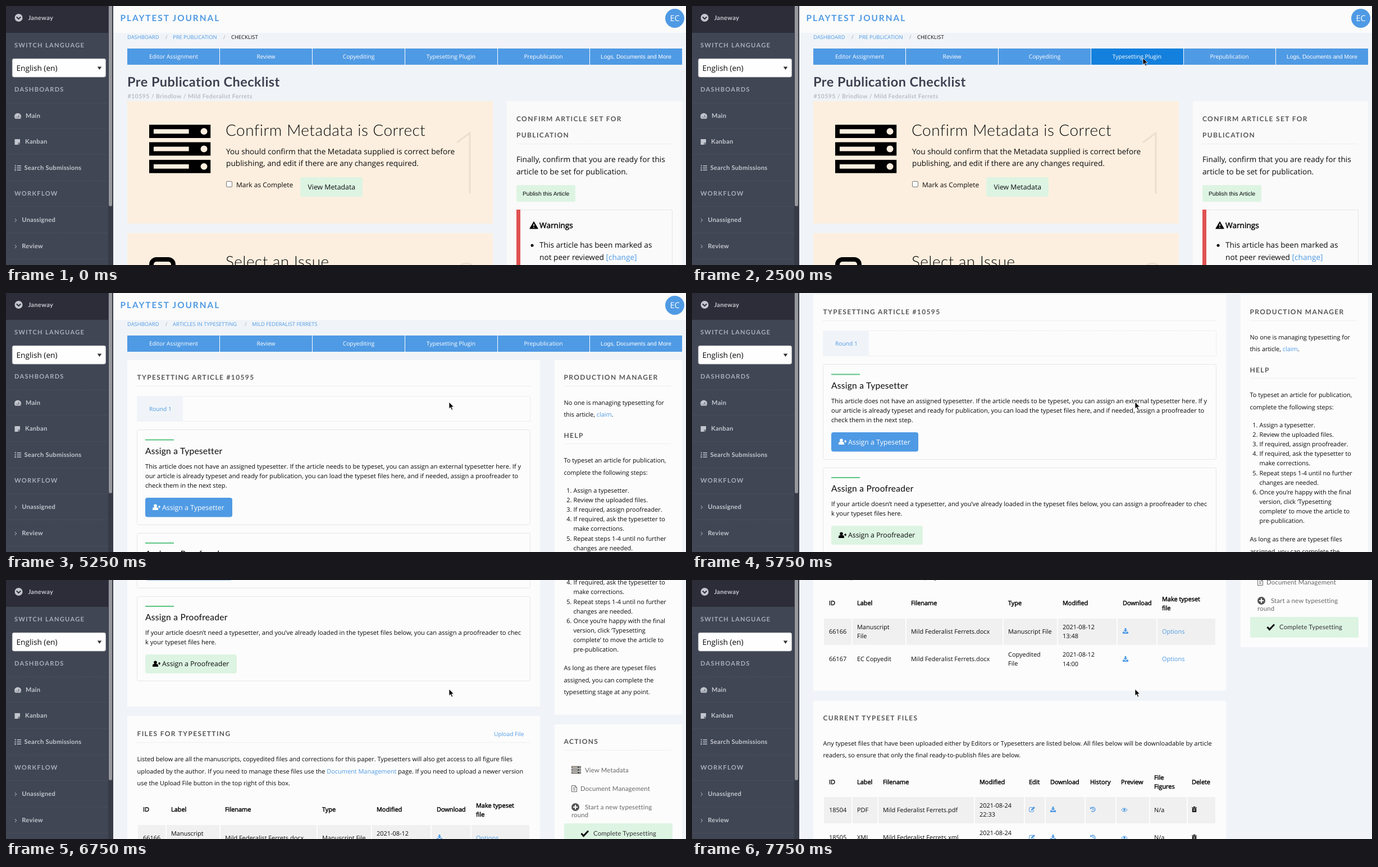
These frames come from a looping animation (1211 px wide and 463 px high, 8 s). An HTML page:

```html
<!DOCTYPE html>
<html lang="en">
<head>
<meta charset="utf-8">
<title>Typesetting workflow</title>
<style>
html, body { margin: 0; width: 100%; height: 100%; overflow: hidden; background: #f0f4f8; }
svg { display: block; }
#stage { width: 100vw; height: 100vh; }
text { font-family: "Open Sans", "Noto Sans", sans-serif; font-size: 10.944px; fill: #0a0a0a; white-space: pre; text-rendering: geometricPrecision; }
.link, .link text { fill: #4f9ae4; }
.white, .white text { fill: #fff; }
.body { font-size: 13.68px; }
.card { font-size: 11.115px; }
.small, .nav text { font-size: 10.26px; }
.nav text { text-anchor: middle; fill: #fff; }
.crumb text { font-size: 9.405px; }
.crumb .sep { fill: #a9a9a9; }
.btn { font-size: 12.31px; }
.arial { font-family: "Liberation Sans", Arial, sans-serif !important; font-size: 10.26px; }
.heavy, .heavy text { stroke: #0a0a0a; stroke-width: .5px; }
.title, .brand, .page, .sub, .step, .head, .act, .side text { font-family: Lato, sans-serif; }
.title { font-size: 11.97px; font-weight: 700; letter-spacing: 1.38px; fill: #555; }
.brand { font-size: 15.4px; font-weight: 700; letter-spacing: 1.94px; fill: #4f9ae4; }
.page { font-size: 23.5px; font-weight: 700; letter-spacing: .46px; fill: #3d4150; }
.sub { font-size: 10.6px; font-weight: 700; letter-spacing: .4px; fill: #b9bcc4; }
.step { font-size: 28px; font-weight: 300; letter-spacing: .45px; }
.head { font-size: 15.6px; letter-spacing: .24px; }
.act { font-size: 11.4px; letter-spacing: .15px; fill: #666; }
.side text { font-size: 11.1px; font-weight: 700; letter-spacing: .3px; fill: #c3c6ce; }
.side .label { letter-spacing: 1.28px; fill: #a9aeb9; }
.side .choice { font: 13.68px "Open Sans", sans-serif; letter-spacing: 0; fill: #0a0a0a; }
.panel { fill: #fcfcfc; }
.box { fill: none; stroke: #e6e6e8; }
.rule { stroke: #e8e8ea; stroke-dasharray: 2 1; }
.green { fill: #ddf4e3; }
.mark { fill: #5cc582; }
.blue { fill: #4f9ae4; }
.cell { fill: #f0f0f0; }
.line { fill: none; stroke: currentColor; }

.hover, .first, .second, .close, .scroll, .cursor { animation: 8s step-end infinite; }
.hover { animation-name: hover; }
.first { animation-name: first; }
.second { animation-name: second; }
.close { animation-name: close; }
.scroll { animation-name: scroll; }
.cursor { animation-name: cursor; }
@keyframes hover {
  0%, 46.875%, 65.625%, 100% { fill: #4f9ae4; }
  28.125%, 62.5% { fill: #2f8be0; }
  31.25% { fill: #1480dd; }
}
@keyframes first { 0% { visibility: visible; } 46.875%, 100% { visibility: hidden; } }
@keyframes second { 0% { visibility: hidden; } 46.875%, 100% { visibility: visible; } }
@keyframes close { 0%, 53.125%, 100% { visibility: hidden; } 46.875% { visibility: visible; } }
@keyframes scroll {
  0% { transform: translateY(0); }
  68.75% { transform: translateY(-30px); }
  71.875% { transform: translateY(-117px); }
  75% { transform: translateY(-210px); }
  78.125% { transform: translateY(-290px); }
  81.25% { transform: translateY(-360px); }
  84.375% { transform: translateY(-400px); }
  87.5% { transform: translateY(-425px); }
  90.625% { transform: translateY(-468px); }
  93.75% { transform: translateY(-620px); }
  96.875%, 100% { transform: translateY(-769px); }
}
@keyframes cursor {
  0% { transform: translate(911px, -40px); }
  9.375% { transform: translate(911px, 1px); }
  12.5% { transform: translate(854px, 50px); }
  15.625% { transform: translate(810px, 82px); }
  18.75% { transform: translate(794px, 95px); }
  28.125% { transform: translate(803px, 93px); }
  62.5% { transform: translate(796px, 133px); }
  65.625%, 100% { transform: translate(789px, 195px); }
}
</style>
</head>
<body>
<svg id="stage" viewBox="0 0 1211 463">
<defs>
  <symbol id="server" viewBox="0 0 110 87">
    <path d="M0 0h110v24H0zM0 31.500h110v24H0zM0 63h110v24H0z"/>
    <path fill="#fdefdf" d="M8 8h63v8H8zM8 39.500h63v8H8zM8 71h63v8H8z"/>
    <g fill="#fdefdf"><circle cx="98" cy="12" r="6"/><circle cx="98" cy="43.500" r="6"/><circle cx="98" cy="75" r="6"/></g>
  </symbol>
  <symbol id="user" viewBox="0 0 14 12">
    <circle cx="5" cy="3.300" r="2.800"/>
    <path d="M0 11V9q0-3 3-3h4q3 0 3 3v2zM10 4.500h1.500V3h1.500v1.500h1.500V6H13v1.500h-1.500V6H10z"/>
  </symbol>
  <symbol id="download" viewBox="0 0 10 10">
    <path d="M3.700 0h2.600v3.500h2.200L5 7 1.500 3.500h2.200zM0 6.500h2.700L5 8.500l2.300-2H10V10H0z"/>
  </symbol>
  <symbol id="edit" viewBox="0 0 11 10">
    <path class="line" d="M7 1.500H2q-1.300 0-1.300 1.300v5.200q0 1.300 1.300 1.300h5.200q1.300 0 1.300-1.300V6.500"/>
    <path d="M4 7V5l5-5 2 2-5 5z"/>
  </symbol>
  <symbol id="history" viewBox="0 0 10 10">
    <path class="line" stroke-width="1.300" d="M1.500 3A4 4 0 1 1 2 8M5 2.800V5.500h1.700"/>
    <path d="M0 .7V4.200h3.500z"/>
  </symbol>
  <symbol id="eye" viewBox="0 0 12 8">
    <path class="line" d="M.6 4Q6-2.500 11.400 4 6 10.500.6 4z"/><circle cx="6" cy="3.800" r="2"/>
  </symbol>
  <symbol id="trash" viewBox="0 0 9 10">
    <path d="M0 1.300h2.700L3.300 0h2.400l.6 1.300H9v1H0zM.8 3h7.400v6q0 1-1 1H1.800q-1 0-1-1z"/>
    <path stroke="#f0f0f0" stroke-width=".7" d="M3 4v4.500M4.500 4v4.500M6 4v4.500"/>
  </symbol>
</defs>

<rect width="1211" height="463" fill="#f0f4f8"/>

<g class="scroll">
  <rect x="190" width="1021" height="48" fill="#fbfbfb"/>
  <text class="brand" x="203.500" y="26.500">PLAYTEST JOURNAL</text>
  <circle class="blue" cx="1191" cy="22" r="17"/>
  <text class="white" x="1191" y="27" text-anchor="middle" style="font-size:14.5px">EC</text>
  <g class="nav">
    <rect class="blue" x="216" y="76" width="988" height="29"/>
    <rect class="hover" x="711" y="76" width="164" height="29"/>
    <path stroke="#fff" d="M380.500 76v29M545.500 76v29M710.500 76v29M875.500 76v29M1039.500 76v29"/>
    <text x="298.500" y="94">Editor Assignment</text>
    <text x="463" y="94">Review</text>
    <text x="628" y="94">Copyediting</text>
    <text x="792.500" y="94">Typesetting Plugin</text>
    <text x="957" y="94">Prepublication</text>
    <text class="arial" x="1122" y="94">Logs, Documents and More</text>
  </g>

  <g class="first">
    <g class="crumb">
      <text class="link" x="216" y="59">DASHBOARD</text><text class="sep" x="284" y="59">/</text>
      <text class="link" x="297" y="59">PRE PUBLICATION</text><text class="sep" x="387" y="59">/</text>
      <text x="401" y="59">CHECKLIST</text>
    </g>
    <text class="page" x="216" y="144">Pre Publication Checklist</text>
    <text class="sub" x="216.500" y="165">#10595 / Brindlow / Mild Federalist Ferrets</text>
    <path fill="#fdefdf" d="M216 170h651v219H216zM216 406h651v70H216z"/>
    <use href="#server" x="255" y="212" width="109.500" height="87"/>
    <text class="step" x="391" y="232">Confirm Metadata is Correct</text>
    <text class="body" x="392" y="264.500">You should confirm that the Metadata supplied is correct before<tspan x="392" dy="21.500">publishing, and edit if there are any changes required.</tspan></text>
    <rect x="392.500" y="313.500" width="10" height="10" rx="1.500" fill="#fff" stroke="#767676"/>
    <text x="410" y="324" style="font-size:11.97px">Mark as Complete</text>
    <rect class="green" x="524" y="306" width="111" height="35" rx="3"/>
    <text class="btn" x="537.500" y="328">View Metadata</text>
    <g fill="none" stroke="#eadfd0" stroke-width="3">
      <path d="M803 244L826 227V335"/><path d="M806 475Q807 460 820 460T834 475"/>
    </g>
    <rect x="259" y="453" width="39" height="40" rx="9" fill="none" stroke="#000" stroke-width="8"/>
    <text class="step" x="391" y="467">Select an Issue</text>

    <rect x="892" y="170" width="312" height="300" fill="#fafafa"/>
    <text class="title" x="909" y="205.500">CONFIRM ARTICLE SET FOR<tspan x="909" dy="29">PUBLICATION</tspan></text>
    <path class="rule" d="M909 246.500h275"/>
    <text class="body" x="909" y="279">Finally, confirm that you are ready for this<tspan x="909" dy="21.500">article to be set for publication.</tspan></text>
    <rect class="green" x="909" y="320" width="105" height="30" rx="3"/>
    <text class="arial" x="920" y="339">Publish this Article</text>
    <rect class="box" x="909.500" y="364.500" width="277" height="110"/>
    <rect x="909" y="364" width="7" height="110" fill="#e05252"/>
    <path d="M940 385.500l7.300 12.500h-14.600z" stroke="#0a0a0a" stroke-linejoin="round"/>
    <path stroke="#fff" stroke-width="1.600" d="M940 389.500v4M940 395v1.600"/>
    <text class="body heavy" x="950" y="397">Warnings</text>
    <circle cx="937" cy="428" r="2.500"/>
    <text class="body" x="950" y="432">This article has been marked as<tspan x="950" dy="21.500">not peer reviewed </tspan><tspan class="link">[change]</tspan></text>
  </g>

  <g class="second">
    <g class="crumb link">
      <text x="216" y="59">DASHBOARD</text><text class="sep" x="284" y="59">/</text>
      <text x="297" y="59">ARTICLES IN TYPESETTING</text><text class="sep" x="425" y="59">/</text>
      <text x="438" y="59">MILD FEDERALIST FERRETS</text>
    </g>
    <path class="panel" d="M216 120h735v506H216zM216 643h735v324H216zM216 985h735v280H216zM977 120h227v521H977zM977 658h227v231H977z"/>

    <text class="title" x="233.500" y="155">TYPESETTING ARTICLE #10595</text>
    <path class="rule" d="M233 166.500h701M233 690.500h701M994 166.500h190M994 269.500h190M994 704.500h190"/>
    <rect class="rule" x="233.500" y="184.500" width="700" height="45" fill="none"/>
    <rect x="233" y="184" width="82" height="46" fill="#f0f4f8"/>
    <text class="small link" x="255" y="210.500">Round 1</text>

    <rect class="box" x="233.500" y="244.500" width="700" height="170" rx="3"/>
    <rect class="mark" x="248" y="261.500" width="51" height="2"/>
    <text class="head" x="248" y="288">Assign a Typesetter</text>
    <text class="card" x="248" y="313.500">This article does not have an assigned typesetter. If the article needs to be typeset, you can assign an external typesetter here. If y<tspan x="248" dy="17">our article is already typeset and ready for publication, you can load the typeset files here, and if needed, assign a proofreader to</tspan><tspan x="248" dy="17">check them in the next step.</tspan></text>
    <rect class="blue" x="248" y="366" width="155" height="34.500" rx="4"/>
    <use class="white" href="#user" x="261" y="377" width="14" height="12"/>
    <text class="btn white" x="278" y="388">Assign a Typesetter</text>

    <rect class="box" x="233.500" y="429.500" width="700" height="151" rx="3"/>
    <rect class="mark" x="248" y="446" width="51" height="2"/>
    <text class="head" x="248" y="472">Assign a Proofreader</text>
    <text class="card" x="248" y="498">If your article doesn’t need a typesetter, and you’ve already loaded in the typeset files below, you can assign a proofreader to chec<tspan x="248" dy="17">k your typeset files here.</tspan></text>
    <rect class="green" x="248" y="533" width="163" height="34" rx="4"/>
    <use href="#user" x="261" y="544" width="14" height="12"/>
    <text class="btn" x="278" y="554">Assign a Proofreader</text>

    <text class="title" x="233.500" y="678.500">FILES FOR TYPESETTING</text>
    <text class="small link" x="869" y="679">Upload File</text>
    <text x="233.500" y="724">Listed below are all the manuscripts, copyedited files and corrections for this paper. Typesetters will also get access to all figure files<tspan x="233.500" dy="21.500">uploaded by the author. If you need to manage these files use the </tspan><tspan class="link">Document Management</tspan><tspan> page. If you need to upload a newer version</tspan><tspan x="233.500" dy="21.500">use the Upload File button in the top right of this box.</tspan></text>
    <g class="heavy">
      <text x="244" y="814">ID</text><text x="294" y="814">Label</text><text x="390" y="814">Filename</text>
      <text x="563" y="814">Type</text><text x="660" y="814">Modified</text><text x="767" y="814">Download</text>
      <text x="837" y="806.500">Make typeset<tspan x="837" dy="16">file</tspan></text>
    </g>
    <path class="cell" d="M235 838h49v47h-49zM286 838h94v47h-94zM382 838h171v47H382zM555 838h95v47h-95zM652 838h104v47H652zM758 838h69v47h-69zM829 838h103v47H829z"/>
    <text x="244" y="864.500">66166</text>
    <text x="294" y="856.500">Manuscript<tspan x="294" dy="16">File</tspan></text>
    <text x="390" y="864.500">Mild Federalist Ferrets.docx</text>
    <text x="563" y="864.500">Manuscript File</text>
    <text x="660" y="856.500">2021-08-12<tspan x="660" dy="16.500">13:48</tspan></text>
    <text class="link" x="837" y="864.500">Options</text>
    <text x="244" y="914">66167</text>
    <text x="294" y="914">EC Copyedit</text>
    <text x="390" y="914">Mild Federalist Ferrets.docx</text>
    <text x="563" y="906">Copyedited<tspan x="563" dy="16">File</tspan></text>
    <text x="660" y="906">2021-08-12<tspan x="660" dy="16.500">14:00</tspan></text>
    <text class="link" x="837" y="914">Options</text>
    <g class="link">
      <use href="#download" x="767" y="855" width="10" height="10"/>
      <use href="#download" x="767" y="905" width="10" height="10"/>
    </g>

    <text class="title" x="233.500" y="1020">CURRENT TYPESET FILES</text>
    <text x="233.500" y="1064.500">Any typeset files that have been uploaded either by Editors or Typesetters are listed below. All files below will be downloadable by article<tspan x="233.500" dy="21.500">readers, so ensure that only the final ready-to-publish files are below.</tspan></text>
    <g class="heavy">
      <text x="244" y="1134">ID</text><text x="294" y="1134">Label</text><text x="340" y="1134">Filename</text>
      <text x="512" y="1134">Modified</text><text x="600" y="1134">Edit</text><text x="638" y="1134">Download</text>
      <text x="709" y="1134">History</text><text x="764" y="1134">Preview</text>
      <text x="823" y="1126">File<tspan x="823" dy="16">Figures</tspan></text><text x="890" y="1134">Delete</text>
    </g>
    <path class="cell" d="M235 1157h49v47h-49zM286 1157h44v47h-44zM332 1157h170v47H332zM504 1157h87v47h-87zM593 1157h35v47h-35zM630 1157h69v47h-69zM701 1157h53v47h-53zM756 1157h58v47h-58zM816 1157h65v47h-65zM883 1157h49v47h-49z"/>
    <text x="244" y="1183.500">18504</text><text x="294" y="1183.500">PDF</text>
    <text x="340" y="1183.500">Mild Federalist Ferrets.pdf</text>
    <text x="512" y="1176">2021-08-24<tspan x="512" dy="16">22:33</tspan></text>
    <text x="823" y="1183.500">N/a</text>
    <text x="244" y="1233">18505</text><text x="294" y="1233">XML</text>
    <text x="340" y="1233">Mild Federalist Ferrets.xml</text>
    <text x="512" y="1225">2021-08-24<tspan x="512" dy="16">22:33</tspan></text>
    <text x="823" y="1233">N/a</text>
    <g id="tools">
      <g class="link" color="#4f9ae4">
        <use href="#edit" x="600" y="1174" width="11" height="10"/>
        <use href="#download" x="638" y="1174" width="10" height="10"/>
        <use href="#history" x="709" y="1174" width="10" height="10"/>
        <use href="#eye" x="764" y="1176" width="12" height="8"/>
      </g>
      <use href="#trash" x="890" y="1174" width="9" height="10"/>
    </g>
    <use href="#tools" y="50"/>

    <text class="title" x="993.500" y="155">PRODUCTION MANAGER</text>
    <text x="993.500" y="199.500">No one is managing typesetting for<tspan x="993.500" dy="21.500">this article, </tspan><tspan class="link">claim</tspan><tspan>.</tspan></text>
    <text class="title" x="993.500" y="258.500">HELP</text>
    <text x="993.500" y="303">To typeset an article for publication,<tspan x="993.500" dy="21.500">complete the following steps:</tspan></text>
    <text text-anchor="end" x="1007.500" y="357">1.<tspan x="1007.500" dy="17.100">2.</tspan><tspan x="1007.500" dy="17.100">3.</tspan><tspan x="1007.500" dy="17.100">4.</tspan><tspan x="1007.500" dy="34.200">5.</tspan><tspan x="1007.500" dy="34.200">6.</tspan></text>
    <text x="1010.500" y="357">Assign a typesetter.<tspan x="1010.500" dy="17.100">Review the uploaded files.</tspan><tspan x="1010.500" dy="17.100">If required, assign proofreader.</tspan><tspan x="1010.500" dy="17.100">If required, ask the typesetter to</tspan><tspan x="1010.500" dy="17.100">make corrections.</tspan><tspan x="1010.500" dy="17.100">Repeat steps 1-4 until no further</tspan><tspan x="1010.500" dy="17.100">changes are needed.</tspan><tspan x="1010.500" dy="17.100">Once you’re happy with the final</tspan><tspan x="1010.500" dy="17.100">version, click ‘Typesetting</tspan><tspan x="1010.500" dy="17.100">complete’ to move the article to</tspan><tspan x="1010.500" dy="17.100">pre-publication.</tspan></text>
    <text x="993.500" y="561">As long as there are typeset files<tspan x="993.500" dy="21.500">assigned, you can complete the</tspan><tspan x="993.500" dy="21.500">typesetting stage at any point.</tspan></text>

    <text class="title" x="993.500" y="693">ACTIONS</text>
    <use href="#server" x="1007" y="732" width="17" height="15" fill="#555"/>
    <text class="act" x="1031" y="743.500">View Metadata</text>
    <path fill="none" stroke="#666" d="M1007.500 767.500h6l3 3v8h-9zM1013.500 767.500v3h3M1010 771h2M1010 773h4M1010 775.500h4"/>
    <text class="act" x="1023" y="777">Document Management</text>
    <circle cx="1014" cy="806" r="7" fill="#555"/>
    <path stroke="#fcfcfc" stroke-width="2" d="M1010 806h8M1014 802v8"/>
    <text class="act" x="1031" y="810">Start a new typesetting<tspan x="1007" dy="13.500">round</tspan></text>
    <rect class="green" x="994" y="835" width="193" height="37" rx="3"/>
    <path fill="none" stroke="#0a0a0a" stroke-width="3" d="M1024.500 853l4 4.500 8.500-9"/>
    <text class="act" style="fill:#333" x="1046" y="856.500">Complete Typesetting</text>
  </g>
</g>

<g class="side">
  <rect width="191" height="463" fill="#404654"/>
  <rect width="191" height="48" fill="#2c2d38"/>
  <path stroke="#4a505d" stroke-dasharray="2 1" d="M0 94.500h183M0 173.500h183M0 218.500h183M0 265.500h183M0 312.500h183M0 358.500h183M0 405.500h183M0 452.500h183"/>
  <rect x="182" width="9" height="463" fill="#363b47"/>
  <rect x="183" y="-6" width="6" height="364" rx="3" fill="#96989d"/>
  <circle cx="22.500" cy="21" r="7" fill="#c3c6ce"/>
  <path fill="none" stroke="#2c2d38" stroke-width="2" d="M18.800 19.500l3.700 3.700 3.700-3.700"/>
  <text x="39.500" y="24.500">Janeway</text>
  <text class="label" x="15" y="73.500">SWITCH LANGUAGE</text>
  <rect x="11.300" y="94.300" width="166.200" height="32.700" rx="3" fill="#fefefe" stroke="#cacaca" stroke-width=".8"/>
  <text class="choice" x="18.500" y="116">English (en)</text>
  <path fill="#333" d="M162.700 108.500h7.600l-3.800 5.500z"/>
  <text class="label" x="15" y="153">DASHBOARDS</text>
  <g fill="#c3c6ce">
    <path d="M16.500 201.500a6 6 0 1 1 9 0z"/>
    <path d="M15.500 238h9.500v6.500h-3.500V248h-6z"/><path d="M22.500 245.500H25l-2.500 2.500z"/>
    <path d="M19.500 285h7.500v1.600h-7.500zM19.500 288.700h7.500v1.600h-7.500zM19.500 292.400h7.500v1.600h-7.500zM16 284h1.200v3H16zM15.500 288.500h2v2h-2zM15.500 292h2v2.500h-2z"/>
  </g>
  <path fill="none" stroke="#404654" d="M21 200l2-5M17.500 198.500h1.500M24 198.500h1.500"/>
  <path fill="none" stroke="#c3c6ce" d="M15.800 380l2.800 3-2.800 3M15.800 427l2.800 3-2.800 3"/>
  <text x="35" y="199.500">Main</text>
  <text x="34" y="246">Kanban</text>
  <text x="32.500" y="293">Search Submissions</text>
  <text class="label" x="15" y="339">WORKFLOW</text>
  <text x="28.300" y="385.500">Unassigned</text>
  <text x="28.300" y="432.500">Review</text>
  <path class="close" stroke="#fff" stroke-width="2.600" d="M163 19l12 12M175 19l-12 12"/>
</g>

<path class="cursor" fill="#000" stroke="#fff" stroke-width=".8" d="M0 0V12L2.700 9.500 4.700 14.200 6.700 13.300 4.700 8.800H8.500z"/>
</svg>
</body>
</html>
```
